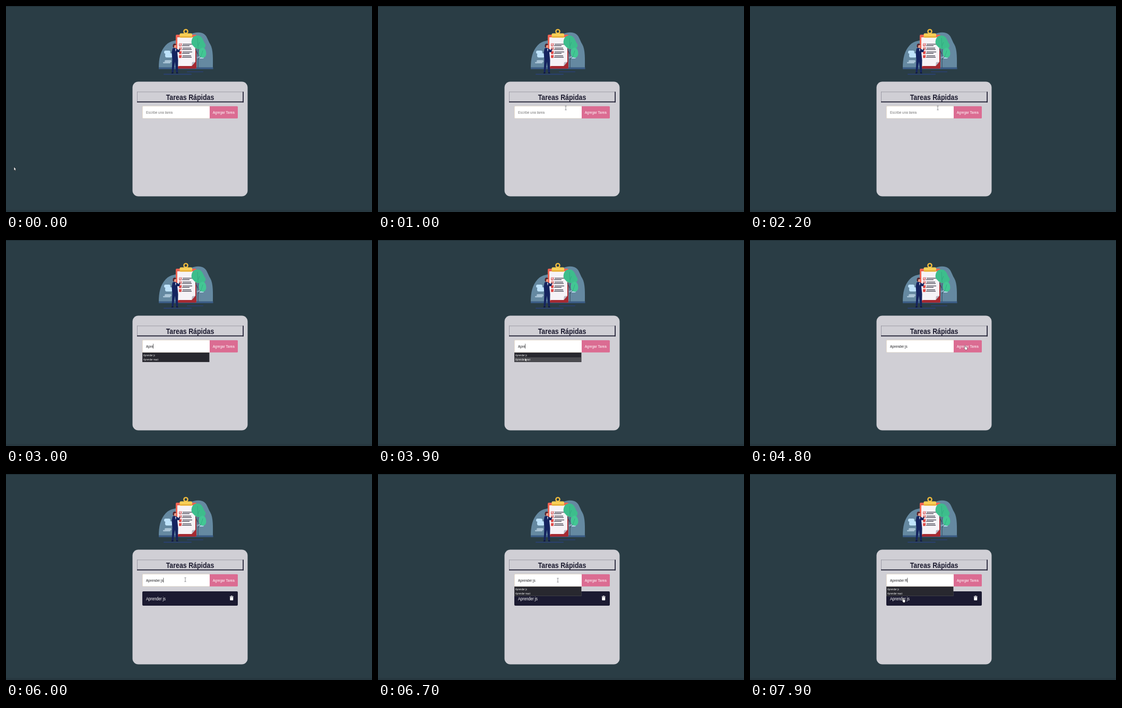
An HTML page with a canvas for the animation above (8 s loop, 690 by 388 pixels).

```html
<!DOCTYPE html>
<html lang="es">
<head>
<meta charset="utf-8">
<title>Tareas Rápidas</title>
<style>
  html, body { margin: 0; width: 100%; height: 100%; overflow: hidden; background: #2a3d45; }
  canvas { display: block; }
</style>
</head>
<body>
<canvas id="stage" width="690" height="388"></canvas>
<script>
const ctx = document.getElementById('stage').getContext('2d');
const LOOP = 8000, STEP = 100;
const SQUEEZE = 0.8;
const SANS = '"Liberation Sans", Arial, sans-serif';
const NARROW_UI = '"Open Sans", sans-serif';

// Pointer keys: time, x, y, shape
const pointerKeys = [
  [0, 15, 303, 'arrow'], [100, 40, 272, 'arrow'], [300, 210, 150, 'arrow'],
  [500, 430, 64, 'arrow'], [600, 470, 82, 'arrow'], [700, 456, 135, 'arrow'],
  [800, 412, 176, 'arrow'], [900, 371, 198, 'beam'], [1000, 354, 192, 'beam'],
  [2700, 354, 192, ''], [3600, 352, 198, 'beam'], [3700, 318, 214, 'arrow'],
  [3900, 277, 222, 'arrow'], [4100, 280, 215, 'arrow'], [4200, 284, 215, 'beam'],
  [4400, 388, 202, 'hand'], [4500, 402, 198, 'hand'], [4700, 404, 198, 'hand'],
  [4800, 405, 198, 'hand'], [5100, 405, 198, 'hand'], [5300, 372, 200, 'beam'],
  [5500, 338, 199, 'beam'], [6000, 338, 199, 'beam'], [6300, 339, 200, 'beam'],
  [7100, 339, 200, ''], [7700, 314, 235, 'hand'], [7900, 288, 233, 'hand']
];
const typed = [
  [0, ''], [2500, 'A'], [2700, 'Ap'], [2800, 'Apr'], [3000, 'Apre'],
  [4200, 'Aprender js'], [7100, 'Aprender j'], [7200, 'Aprender '], [7900, 'Aprender R']
];
const caretTimes = [[1700, 2200], [2500, 3300], [3800, 4500], [6000, 6500], [7100, 7700], [7900, 8000]];
const menuTimes = [[2500, 4200], [6500, 8000]];

const within = (spans, t) => spans.some(([a, b]) => t >= a && t < b);
const latest = (keys, t) => keys.findLastIndex(k => k[0] <= t);

function pointerAt(t) {
  const i = latest(pointerKeys, t);
  const a = pointerKeys[i], b = pointerKeys[i + 1] || a;
  const p = b === a ? 0 : (t - a[0]) / (b[0] - a[0]);
  return { x: a[1] + (b[1] - a[1]) * p, y: a[2] + (b[2] - a[2]) * p, shape: a[3] };
}

function rect(x, y, w, h, color, r = 0) {
  ctx.fillStyle = color;
  ctx.beginPath();
  ctx.roundRect(x, y, w, h, r);
  ctx.fill();
}

function oval(x, y, rx, ry, color) {
  ctx.fillStyle = color;
  ctx.beginPath();
  ctx.ellipse(x, y, rx, ry, 0, 0, Math.PI * 2);
  ctx.fill();
}

function shape(d, fill, stroke, width = 1) {
  const path = new Path2D(d);
  if (fill) { ctx.fillStyle = fill; ctx.fill(path); }
  if (stroke) { ctx.strokeStyle = stroke; ctx.lineWidth = width; ctx.stroke(path); }
}

// Draws a line of text and returns its width on the stage
function text(str, x, y, size, color, { font = SANS, weight = 'normal', align = 'left' } = {}) {
  ctx.save();
  ctx.translate(x, y);
  ctx.scale(SQUEEZE, 1);
  ctx.font = `${weight} ${size}px ${font}`;
  ctx.textAlign = align;
  ctx.fillStyle = color;
  ctx.fillText(str, 0, 0);
  const width = ctx.measureText(str).width * SQUEEZE;
  ctx.restore();
  return width;
}

function drawScenery() {
  shape('M288 118C288 98 291 85 301 74C310 64 322 66 332 61C345 53 358 47 370 51C379 54 380 64 385 72C391 82 390 100 390 118Z', '#6589a1');
  rect(288, 115.5, 102.5, 3.5, '#3b5c84');
  rect(297, 127.7, 53, 1.6, '#2a427c', 1);
  rect(341, 123.3, 31, 1.2, '#2a427c', 1);
  rect(298, 84, 12, 6, '#bfe3fb', 3);
  rect(300, 89, 14, 8, '#bfe3fb', 3);
  rect(299, 102, 13, 4, '#a9c4d6', 2);
  rect(296, 105.5, 14, 2.5, '#a9c4d6', 1);
  rect(360, 95, 13, 4, '#b4d5e8', 2);
}

function drawClipboard() {
  rect(320, 54, 39, 64, '#ee6353', 2);
  shape('M322 118L359 80V116Q359 118 357 118Z', '#a52a32');
  shape('M323 59H357V105L350 113H323Z', '#f6f3f7');
  shape('M350 113L351 106L357 105Z', '#b9b4c0');
  ctx.strokeStyle = '#f2bd3e';
  ctx.lineWidth = 2.4;
  ctx.beginPath();
  ctx.arc(339, 48, 3.6, 0, Math.PI * 2);
  ctx.stroke();
  rect(327.5, 51.5, 23.5, 8, '#f8cf57', 2);
  rect(327.5, 57, 23.5, 2.5, '#e6ad35', 1);
  for (let i = 0; i < 4; i++) {
    const y = 71 + i * 7.3;
    shape(`M326.5 ${y}h4v4.5h-4Z`, i > 1 ? '#e95550' : null, '#dc4d49', 0.9);
    shape(`M327 ${y + 2}l1.5 1.5l3-4`, null, '#c4343b', 0.8);
    rect(333, y + 0.3, 18 - i % 2 * 2, 1.3, '#42404e');
    rect(332, y + 3, 14 + i % 2 * 4, 1.3, '#42404e');
  }
}

function drawTree() {
  shape('M362 116V76M362 101L371 89M362 92L357 80', null, '#365366', 1.2);
  shape('M350 65C351 58 357 54 364 56C371 58 372 67 376 72C378 78 372 82 366 81C359 82 355 78 353 75C350 73 349 69 350 65Z', '#3dbd8c');
  shape('M365 82C369 76 376 78 377 86C379 94 374 99 369 97C364 96 362 87 365 82Z', '#43c794');
  shape('M361 60L362 80M365 68L362 75M371 84L367 97', null, '#2d9d78', 0.6);
}

function drawMan() {
  oval(318.2, 75.5, 2.8, 4, '#e99a86');
  shape('M314.5 77Q314 70.5 318 70.8Q321 71 321 73L317 74.5L317 79Z', '#57272f');
  shape('M314 80Q318 78 321 80L326 83L327 79L328.5 80L327 87L323 87L324.5 102L324 125H321L318.5 105L315.5 125H312.5L313.5 101L312.5 88Z', '#15245f');
  shape('M319 80L321 82L319.5 86Z', '#ecf3fb');
  oval(327.5, 79.5, 1.4, 1.4, '#e99a86');
  shape('M311.5 127Q312 124.5 315.5 125V127ZM321 127V125Q324 124.5 325 127Z', '#0c1238');
}

function drawCard() {
  rect(238.5, 142.5, 217, 216, '#d0cfd5', 11);
  rect(247, 161.5, 201, 0.8, '#8d8c98');
  rect(247, 161.5, 0.8, 20, '#8d8c98');
  rect(446.3, 161.5, 1.7, 20, '#1b1a2e');
  rect(247, 179.8, 201, 1.7, '#1b1a2e');
  text('Tareas Rápidas', 347, 176.5, 15.5, '#1b1a2e', { weight: 'bold', align: 'center' });
  rect(257, 188.3, 127.5, 23.5, '#e9dcc8', 1.5);
  rect(257.8, 189, 126.2, 22.2, '#fff', 1);
  rect(384, 188.7, 53, 23, '#db6c92', [0, 1.5, 1.5, 0]);
  text('Agregar Tarea', 410.3, 203, 8.1, '#fff', { align: 'center' });
}

function drawField(t) {
  const value = typed[latest(typed, t)][1];
  if (!value) text('Escribe una tarea', 264, 203, 8, '#757575');
  const width = text(value, 264, 203, 8, '#202024');
  if (within(caretTimes, t)) rect(263.8 + width, 195.5, 0.7, 9, '#222');
}

function drawItem() {
  rect(257, 221, 180, 27, '#1b1a31', 2);
  text('Aprender js', 264, 237.5, 9, '#fff');
  rect(421.8, 230.2, 7, 1.3, '#fff', 0.5);
  rect(424, 229.2, 2.6, 1.4, '#fff', 0.5);
  rect(422.3, 232, 6, 6, '#fff', [0, 0, 1, 1]);
}

function drawMenu(pointer) {
  rect(257, 212, 126.5, 18, '#55555a');
  rect(257.4, 212.3, 125.7, 17.3, '#28282f');
  const over = pointer.shape && pointer.x > 257 && pointer.x < 384 && pointer.y < 230;
  ['Aprender js', 'Aprender react'].forEach((label, i) => {
    const top = 212.3 + i * 8.7;
    if (over && pointer.y >= top && pointer.y < top + 8.7) rect(257.4, top, 125.7, 8.6, '#4b4b50');
    text(label, 259, top + 6.4, 5.1, '#fff', { font: NARROW_UI });
  });
}

function drawPointer({ x, y, shape: kind }) {
  ctx.save();
  ctx.translate(x, y);
  if (kind === 'arrow') shape('M0 0V6.6L1.4 5.4L2.4 7.6L3.4 7.1L2.5 5H4.2Z', '#fff', '#111', 0.5);
  if (kind === 'beam') shape('M-1.6-3.7H1.6M0-3.7V3.7M-1.6 3.7H1.6', null, '#77777b', 0.8);
  if (kind === 'hand') shape('M0 .8Q.7-.6 1.4.8V3.4L4.6 4.2V7L3.8 9H1L-1.2 5.5L-.6 4.8L0 5.3Z', '#fff', '#222', 0.45);
  ctx.restore();
}

function draw(t) {
  rect(0, 0, 690, 388, '#2a3d45');
  rect(0, 0, 690, 1, '#1c2b32');
  rect(0, 384, 690, 4, '#273840');
  drawScenery();
  drawClipboard();
  drawTree();
  drawMan();
  drawCard();
  drawField(t);
  const pointer = pointerAt(t);
  if (t >= 5000) drawItem();
  if (within(menuTimes, t)) drawMenu(pointer);
  drawPointer(pointer);
}

const start = performance.now();
function tick() {
  const t = (performance.now() - start) % LOOP;
  draw(Math.floor(t / STEP) * STEP);
  requestAnimationFrame(tick);
}
tick();
</script>
</body>
</html>
```
